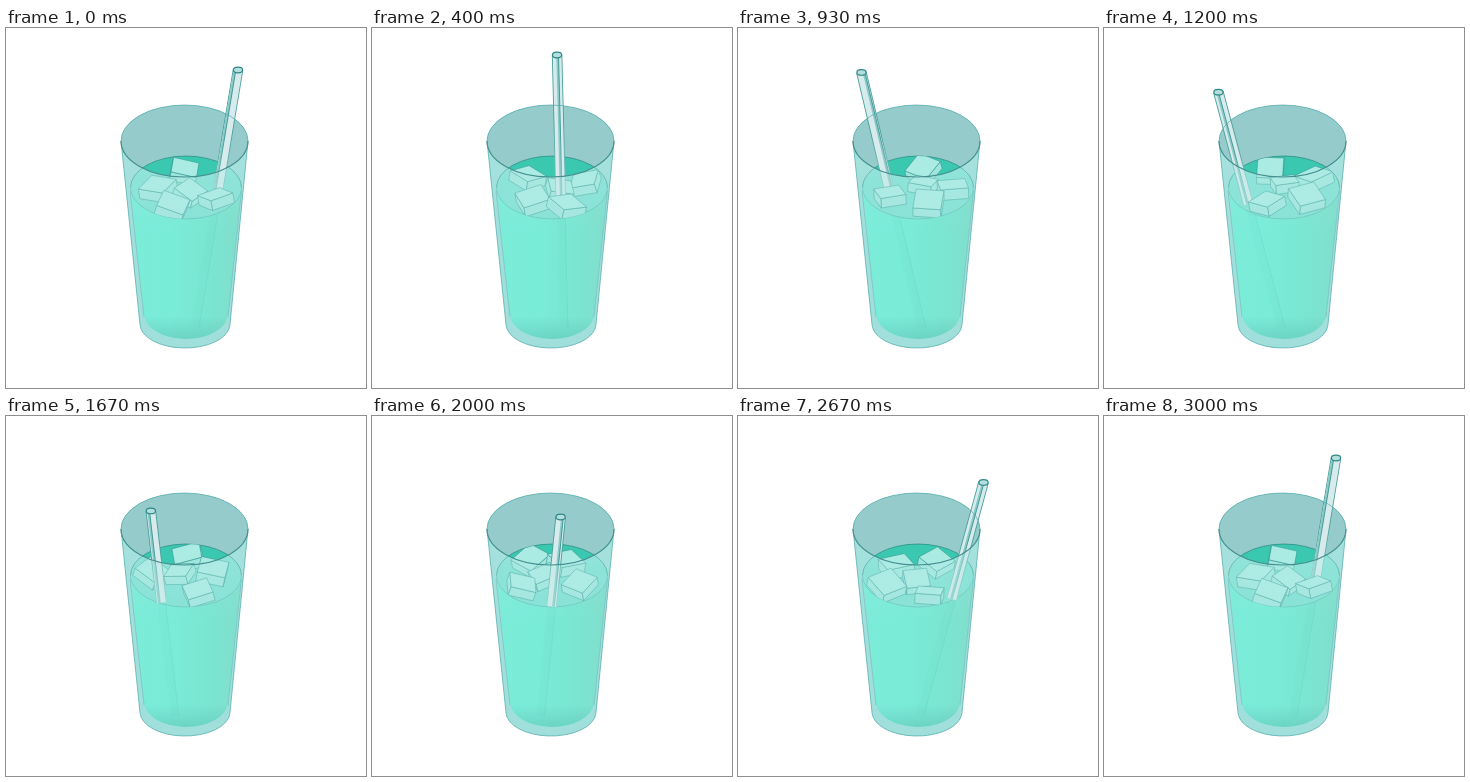
These frames come from a looping animation (360 by 360 pixels, 3.07 s). An HTML page with a canvas:

```html
<!DOCTYPE html>
<html lang="en">
<head>
<meta charset="utf-8">
<title>Iced drink</title>
<style>
html, body { margin: 0; width: 100%; height: 100%; overflow: hidden; background: #fff; }
canvas { display: block; width: 360px; height: 360px; }
</style>
</head>
<body>
<canvas id="stage" width="360" height="360"></canvas>
<script>
const g = document.getElementById('stage').getContext('2d');
const { sin, cos, PI, hypot } = Math;
const LOOP = 3070, FRAMES = 45, STEP = 3000 / FRAMES, TILT = 0.56, RISE = 0.83;

// Ice: flat x, flat y, half size, yaw, lean
const ice = [
  [-2, -31, 13, 0.1, 0.2],
  [-28, 0, 14, 0.5, -0.15],
  [-14, 32, 14, 0.25, 0.25],
  [30, 18, 13, 1.0, -0.3],
  [4, 7, 12, 0.7, 0.25]
];

// Box faces as corner numbers; bits give the x, y and z sides
const faces = [[0, 4, 6, 2], [1, 3, 7, 5], [0, 1, 5, 4], [2, 6, 7, 3], [4, 5, 7, 6]];

const orbit = (a, c, p, q) => c + p * cos(a) + q * sin(a);

function oval(x, y, rx, ry) {
  const p = new Path2D();
  p.ellipse(x, y, rx, ry, 0, 0, 2 * PI);
  return p;
}

function cup(x, y, rx, ry, bx, by, brx, bry) {
  const p = new Path2D();
  p.ellipse(x, y, rx, ry, 0, PI, 2 * PI);
  p.ellipse(bx, by, brx, bry, 0, 0.06, PI - 0.06);
  p.closePath();
  return p;
}

function arc(x, y, rx, ry, from, to) {
  const p = new Path2D();
  p.ellipse(x, y, rx, ry, 0, from, to);
  return p;
}

function paint(path, fill, stroke, width = 1) {
  if (fill) { g.fillStyle = fill; g.fill(path); }
  if (stroke) { g.strokeStyle = stroke; g.lineWidth = width; g.stroke(path); }
}

function line(x1, y1, x2, y2, color, width) {
  const p = new Path2D();
  p.moveTo(x1, y1);
  p.lineTo(x2, y2);
  paint(p, null, color, width);
}

function clipped(path, rule, work) {
  g.save();
  g.clip(path, rule);
  work();
  g.restore();
}

function fade(x1, y1, x2, y2, ...colors) {
  const f = g.createLinearGradient(x1, y1, x2, y2);
  colors.forEach((c, i) => f.addColorStop(i / (colors.length - 1), c));
  return f;
}

const rim = oval(178.5, 113, 63.5, 36);
const body = cup(178.5, 113, 63.5, 36, 179, 296, 45, 24);
const surface = oval(180, 159.5, 55.5, 31.5);
const liquid = cup(180, 159.5, 55.5, 31.5, 180, 286, 42, 25);
const front = new Path2D(body);
front.addPath(rim);

const drink = fade(125, 0, 235, 0, '#68ecd4', '#66edd3', '#66e6cc', '#70d9c3');
const floor = fade(0, 288, 0, 311, 'rgba(70,175,162,0)', 'rgba(70,175,162,.5)');
const wall = fade(0, 140, 0, 205, 'rgba(178,234,229,.4)', 'rgba(178,234,229,.25)');

function cube([fx, fy, s, yaw, lean], a) {
  const cx = orbit(a, 180, fx, fy), cy = 161 + TILT * orbit(a, 0, fy, -fx);
  const b = yaw - a, pts = [];
  for (let i = 0; i < 8; i++) {
    const x0 = i & 1 ? s : -s, y0 = i & 2 ? s : -s, z0 = i & 4 ? s * 0.4 : -s * 0.4;
    const x1 = x0 * cos(lean) + z0 * sin(lean), z = z0 * cos(lean) - x0 * sin(lean);
    pts.push([cx + x1 * cos(b) - y0 * sin(b),
              cy + TILT * (x1 * sin(b) + y0 * cos(b)) - RISE * z]);
  }
  faces.forEach((f, n) => {
    let area = 0;
    const p = new Path2D();
    f.forEach((c, i) => {
      const [x, y] = pts[c], [u, v] = pts[f[(i + 1) % 4]];
      area += x * v - u * y;
      p.lineTo(x, y);
    });
    p.closePath();
    if (area > 0) paint(p, n === 4 ? '#aaebe4' : '#a0e6de', 'rgba(45,145,138,.6)', 0.9);
  });
}

function straw(tx, ty, ex, ey, a) {
  const len = hypot(ex - tx, ey - ty);
  const nx = (ey - ty) / len, ny = (tx - ex) / len;
  const strip = (off, color, width) =>
    line(tx + nx * off, ty + ny * off, ex + nx * off, ey + ny * off, color, width);
  strip(0, fade(tx, ty, ex, ey, '#4b9f9c', '#4b9f9c', '#8fcfca'), 10.5);
  strip(0, '#d7ebed', 8.7);
  const off = -3.2 * cos(2 * a);
  strip(off, '#8bcac7', 2.2);
  strip(off + 1.1, fade(tx, ty, ex, ey, '#37938f', '#37938f', '#83c8c3'), 0.9);
  paint(oval(tx, ty, 4.6, 2.8), '#b5dfdf', '#2e8985', 1.2);
}

function draw(a) {
  g.clearRect(0, 0, 360, 360);
  const tx = orbit(a, 180, 52, -40), ty = orbit(a, 64, -22, -30);
  const bx = orbit(a, 180, 9, 8), by = 300;
  const ey = orbit(a, 179, -4, -11);
  const ex = tx + (bx - tx) * (ey - ty) / (by - ty);

  paint(body, '#9bdbd8');
  paint(rim, '#96cbcb');
  paint(liquid, drink);
  clipped(liquid, 'nonzero', () => {
    paint(arc(180, 286, 42, 25, 0, PI), floor);
    line(ex, ey, bx, by, 'rgba(70,195,176,.1)', 8);
    line(ex + 4, ey, bx + 4, by, 'rgba(50,165,150,.16)', 1);
  });

  paint(surface, '#3bc8b0');
  clipped(front, 'evenodd', () => paint(surface, '#79dfd0'));
  paint(arc(180, 159.5, 55.5, 31.5, PI, 2 * PI), null, 'rgba(45,125,122,.65)');
  paint(arc(180, 159.5, 55.5, 31.5, 0, PI), null, 'rgba(90,175,172,.6)');

  // Ice behind the straw, the straw, then ice in front of it
  const depth = c => 161 + TILT * orbit(a, 0, c[1], -c[0]);
  const sorted = [...ice].sort((p, q) => depth(p) - depth(q));
  const cubes = list => clipped(surface, 'nonzero', () => list.forEach(c => cube(c, a)));
  cubes(sorted.filter(c => depth(c) < ey - 6));
  straw(tx, ty, ex, ey, a);
  cubes(sorted.filter(c => depth(c) >= ey - 6));

  g.fillStyle = wall;
  g.fill(front, 'evenodd');
  line(124, 163, 138, 289, 'rgba(60,150,150,.3)', 1);
  line(235.5, 163, 222, 289, 'rgba(60,150,150,.3)', 1);
  paint(body, null, 'rgba(80,170,170,.7)');
  paint(arc(178.5, 113, 63.5, 36, 0, PI), null, '#45908f', 1.2);
}

function tick(now) {
  const frame = Math.floor((now % LOOP + 4) / STEP);
  draw(frame % FRAMES * 2 * PI / FRAMES);
  requestAnimationFrame(tick);
}
draw(0);
requestAnimationFrame(tick);
</script>
</body>
</html>
```
